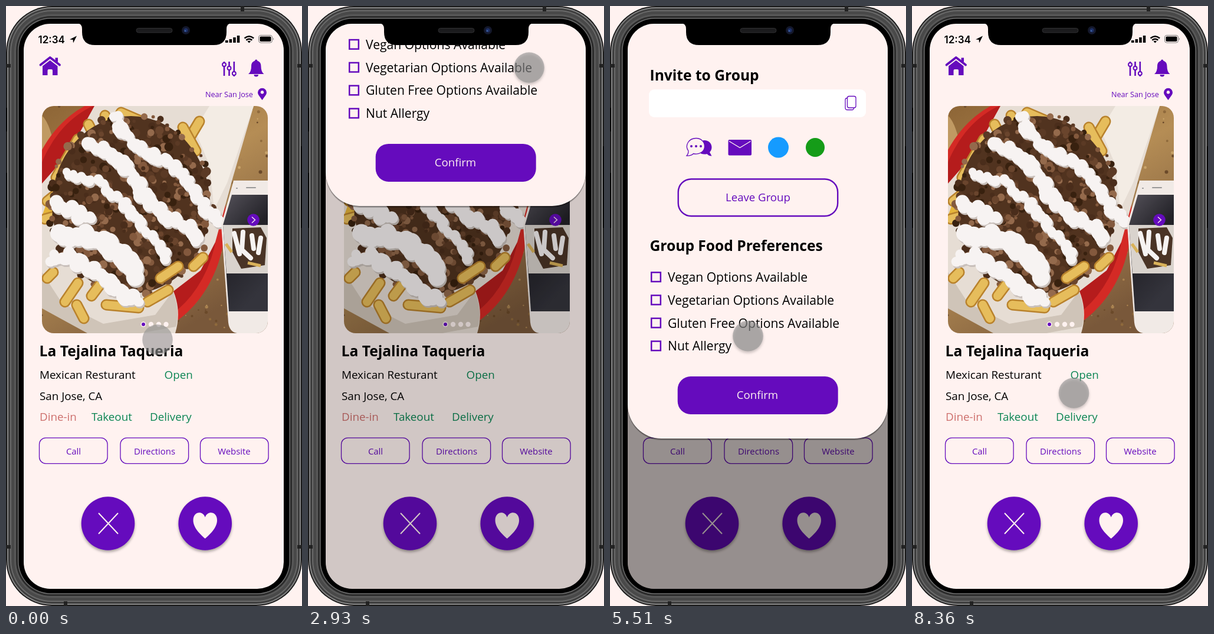
These frames come from a looping animation (502 px wide and 1014 px high, 8920 ms). An HTML page:

```html
<!DOCTYPE html>
<html lang="en">
<head>
<meta charset="utf-8">
<title>Restaurant finder</title>
<style>
html, body { margin: 0; height: 100%; overflow: hidden; background: #fff2f0; }
svg { display: block; width: 100%; height: 100%; }
text { font-family: "Open Sans", "Noto Sans", sans-serif; font-size: 18.8px; }
.h { font-size: 24.6px; font-weight: 700; }
.opt { font-size: 21.1px; }
.btn { font-size: 14.9px; text-anchor: middle; }
.big { font-size: 18.6px; text-anchor: middle; }
.p { fill: #650bbd; }
.o { fill: none; stroke: #650bbd; }
.w { fill: none; stroke: #fff2f0; }
.green { fill: #0b8553; }
.shade { filter: drop-shadow(0 3px 2px #0005); }
</style>
</head>
<body>
<svg viewBox="0 0 502 1014" xmlns="http://www.w3.org/2000/svg">
  <defs>
    <clipPath id="screen"><rect x="30" y="30" width="441" height="955" rx="45"/></clipPath>
    <clipPath id="card"><rect x="61" y="169" width="383" height="384" rx="20"/></clipPath>
    <linearGradient id="table" x2=".6" y2="1">
      <stop stop-color="#8d6536"/><stop offset=".5" stop-color="#b58d55"/><stop offset="1" stop-color="#79583a"/>
    </linearGradient>
    <linearGradient id="glass" y2="1" x2=".4">
      <stop stop-color="#55525a"/><stop offset=".5" stop-color="#222127"/><stop offset="1" stop-color="#34343c"/>
    </linearGradient>
  </defs>

  <g id="body"></g>

  <g clip-path="url(#screen)">
    <path fill="#fff2f0" d="M30 30h441v955H30z"/>

    <!-- status bar -->
    <text x="54.5" y="63" style="font:600 17px Inter,sans-serif">12:34</text>
    <path d="M120 50.500L108 56.500l5.500.500.500 5.500z"/>
    <path d="M372 58h4.500v4H372zM378.600 56h4.500v6h-4.500zM385.200 53h4.500v9h-4.500zM391.800 50h4.500v12h-4.500z"/>
    <path fill="none" stroke="#000" stroke-width="2.500" d="M404.500 54.500q7.800-6.500 15.600 0M407.300 57.700q5-4 10 0"/>
    <path d="M409.500 59.800q2.800-2 5.600 0l-2.800 2.800z"/>
    <rect x="428.500" y="49.500" width="23" height="12.500" rx="3.500" fill="none" stroke="#777"/>
    <rect x="430.500" y="51.500" width="19" height="8.500" rx="1.800"/>
    <path fill="#777" d="M453 53.500q2 2.200 0 4.500z"/>

    <!-- toolbar -->
    <path class="o" stroke-width="3.800" stroke-linejoin="round" stroke-linecap="round" d="M58.500 99.500L74.700 87l16.300 12.500"/>
    <path class="p" d="M62 101.500l12.700-9.700 12.800 9.700V117H79v-8q0-2-2-2h-4.500q-2 0-2 2v8H62zM83.500 87.500h4.500v7h-4.500z"/>
    <g class="o" stroke-width="2">
      <path d="M370 94v2m0 6v16M378.500 94v8m0 6v10M386.800 94v17m0 6v2" stroke-width="2.600"/>
      <circle cx="370" cy="99" r="3"/><circle cx="378.500" cy="105" r="3"/><circle cx="386.800" cy="114" r="3"/>
    </g>
    <path class="p" d="M411 115q5-4 5-13c0-6 3-8.500 6-9.200a2.200 2.200 0 0 1 4.400 0c3 .7 6.100 3.200 6.100 9.200q0 9 5 13zM420.500 116h7.500a3.700 3.500 0 0 1-7.500 0z"/>
    <text class="p" x="338" y="153.500" style="font-size:12.600px">Near San Jose</text>
    <path class="p" fill-rule="evenodd" d="M434.500 159c-4-6-7.500-9-7.500-13a7.500 7.200 0 0 1 15 0c0 4-3.500 7-7.500 13zm0-16a2.800 2.800 0 1 0 .01 0z"/>

    <!-- picture of the dish -->
    <g clip-path="url(#card)">
      <path fill="url(#table)" d="M61 169h383v384H61z"/>
      <g id="grain"></g>
      <path fill="#c09a63" d="M61 185q16 15 25 75l-8 35-17 15z"/>
      <ellipse cx="203" cy="356" rx="170" ry="205" fill="#d42a25"/>
      <ellipse cx="202" cy="352" rx="158" ry="195" fill="#b51c1c"/>
      <path fill="#e6ddd4" d="M150 169h270l-35 120-30 110-25 48-46 35q14 35 3 71H165q-45-14-75-35l-29-28V300l44-50z"/>
      <path fill="#f3ece4" d="M345 169h75l-45 130-22 45-8-75-25-60z"/>
      <path fill="#cfc4b8" d="M61 450l34 52 70 35 88-15 30-40q13 35 5 60l-60 11h-90l-77-42z"/>
      <path fill="#e5b53b" d="M112 235l45 20-20 60-55 40-21 0 25-70z"/>
      <g id="fries" stroke-linecap="round"></g>
      <ellipse cx="212" cy="336" rx="134" ry="150" fill="#51331f"/>
      <g id="meat"></g>
      <g id="front" stroke-linecap="round"></g>
      <use href="#sauce" x="2" y="3" fill="#c9c0bb"/>
      <g id="sauce"></g>
      <path fill="#f1eae6" d="M386 295h58v258h-52q-13-2-15-18l-12-165z"/>
      <path fill="url(#glass)" d="M383 319h61v197h-66l-10-146z"/>
      <path fill="#d9d3cd" d="M368 370h76v82h-70z"/>
      <path fill="#4a3426" d="M384 376l48-2 10 18-3 46-40 6-15-28z"/>
      <path fill="none" stroke="#f6f3f2" stroke-width="8" stroke-linecap="round" d="M387 384l9 35M402 382l-2 30 15 14M417 388l3 22M432 392l-4 25"/>
      <path stroke="#d9b25a" stroke-width="5" d="M373 402l10 14M410 434l22 5"/>
      <path stroke="#999" stroke-width="2" stroke-linecap="round" d="M408 307h15M391 308h1"/>
    </g>
    <circle class="p" cx="419.500" cy="361.500" r="10.300"/>
    <path class="w" stroke-width="1.300" d="M417 356.500l5.500 5-5.500 5"/>
    <g fill="#fff2f0">
      <circle cx="233" cy="538" r="4.500"/><circle cx="246" cy="538" r="4.200"/>
      <circle cx="259" cy="538" r="4.200"/><circle cx="271.500" cy="538" r="4.200"/>
    </g>
    <circle class="p" cx="233" cy="538" r="3"/>

    <!-- details -->
    <text class="h" x="56.500" y="591.500">La Tejalina Taqueria</text>
    <text x="57" y="630">Mexican Resturant</text>
    <text class="green" x="268.500" y="630">Open</text>
    <text x="57" y="665.500">San Jose, CA</text>
    <text x="57" y="701" fill="#cd6f6c">Dine-in</text>
    <text class="green" x="145" y="701">Takeout</text>
    <text class="green" x="244" y="701">Delivery</text>
    <g class="o" stroke-width="1.300">
      <rect x="56.500" y="729.800" width="115.600" height="43.500" rx="11"/>
      <rect x="194" y="729.800" width="115.600" height="43.500" rx="11"/>
      <rect x="329.500" y="729.800" width="115.600" height="43.500" rx="11"/>
    </g>
    <text class="p btn" x="114.500" y="757.500">Call</text>
    <text class="p btn" x="252" y="757.500">Directions</text>
    <text class="p btn" x="387" y="757.500">Website</text>
    <circle class="p shade" cx="173" cy="874.500" r="45.300"/>
    <circle class="p shade" cx="337.700" cy="874.500" r="45.300"/>
    <path class="w" stroke-width="2" d="M157 857l33 35M190 857l-33 35"/>
    <path fill="#fff2f0" d="M337.700 900c-8-7-20.200-18-20.200-31 0-15 16-17 20.200-5 4.200-12 20.300-10 20.300 5 0 13-12.300 24-20.300 31z"/>

    <path id="dim" d="M30 30h441v955H30z"/>

    <!-- sliding panel -->
    <g id="panel">
      <rect x="30" y="-100" width="441" height="834" rx="57" opacity=".18"/>
      <rect x="30" y="-100" width="441" height="832.500" rx="57" opacity=".3"/>
      <rect x="30" y="-100" width="441" height="831" rx="57" fill="#fff2f0"/>
      <text class="h" x="67.500" y="125.500">Invite to Group</text>
      <rect x="66" y="141" width="368" height="47" rx="9" fill="#fff"/>
      <g class="o" stroke-width="1.300">
        <rect x="402.500" y="152.500" width="14.500" height="19.500" rx="3"/>
        <path d="M402.500 155.500q-3.500 0-3.500 3.500v13q0 3.500 3.500 3.500h8q3 0 3-3.500"/>
      </g>
      <path class="p" d="M158 227c9-1 14.500 5 14.500 11.500 0 4-1.500 6.500-3.500 8.500l3.500 6.500q-5 0-8-3.500-8 2-14-3z"/>
      <path fill="#fff2f0" stroke="#650bbd" stroke-width="1.300" d="M130 253q3-3 3-8c-7-10 1-21.500 13-21.500 8.500 0 14.500 6 14.500 13.500 0 9-9 15-19 12.500q-4 4-11.500 3.500z"/>
      <g class="p"><circle cx="138" cy="237" r="2"/><circle cx="146" cy="237" r="2"/><circle cx="154" cy="237" r="2"/></g>
      <rect class="p" x="200.500" y="226" width="39.500" height="26.500" rx="2"/>
      <path class="w" stroke-width="1.400" d="M202 228.500l18.300 11 18.200-11"/>
      <circle cx="285.500" cy="239" r="17.500" fill="#159bff"/>
      <circle cx="348" cy="239" r="16" fill="#159c18"/>
      <rect class="o" stroke-width="2.400" x="115.700" y="292.500" width="270.500" height="62.500" rx="22"/>
      <text class="p big" x="251" y="330">Leave Group</text>
      <text class="h" x="67.500" y="413.800">Group Food Preferences</text>
      <g id="options"></g>
      <rect class="p" x="114.700" y="626" width="272" height="64" rx="22"/>
      <text class="big" x="250" y="664" fill="#fff2f0">Confirm</text>
    </g>
  </g>

  <!-- notch -->
  <path d="M120 29q9 0 9 10v5q0 22 22 22h201q22 0 22-22v-5q0-10 9-10z"/>
  <rect x="221" y="37.500" width="61" height="7.500" rx="3.700" fill="#1b1b1d" stroke="#303033"/>
  <circle cx="305" cy="41" r="7" fill="#14182b"/>
  <circle cx="305" cy="41" r="3.500" fill="#1d2f66"/>
  <circle cx="304" cy="42" r="1.300" fill="#4267a8"/>

  <circle id="touch" r="25.800" fill="#929292" fill-opacity=".6"/>
</svg>
<script>
const $ = id => document.getElementById(id);
let seed = 7;
const rnd = () => (seed = seed * 16807 % 2147483647) / 2147483647;
const pick = list => list[Math.floor(rnd() * list.length)];
const dot = (x, y, r, fill) =>
  `<circle cx="${x.toFixed(1)}" cy="${y.toFixed(1)}" r="${r.toFixed(1)}"${fill ? ` fill="${fill}"` : ''}/>`;
const repeat = (n, make) => Array.from({ length: n }, (_, i) => make(i)).join('');

// Phone shell: nested rounded rectangles, antenna bands, side keys
const rails = [[0, '#1b1b1b'], [2, '#858585'], [4, '#3d3d3d'], [7, '#6a6a6a'], [9, '#494949'],
  [14, '#585858'], [17, '#2b2b2b'], [20, '#707070'], [21.5, '#000']];
$('body').innerHTML = rails.map(([d, c]) =>
  `<rect x="${d}" y="${d}" width="${502 - 2 * d}" height="${1014 - 2 * d}" rx="${78 - 1.1 * d}" fill="${c}"/>`).join('') +
  '<path fill="#222" d="M0 98h8v6H0zM494 98h8v6h-8zM0 911h8v6H0zM494 911h8v6h-8zM398 0h6v9h-6zM98 1006h6v8h-6z"/>' +
  '<path d="M0 172h2v40H0zM0 282h2v93H0zM500 237h2v138h-2z"/>';

// Dish
$('grain').innerHTML = repeat(220, () =>
  dot(61 + rnd() * 383, 169 + rnd() * 384, 1 + rnd() * 2, pick(['#6b4a2a', '#c9a46a', '#8f6a3c', '#a98250'])));
$('meat').innerHTML = repeat(480, () => {
  const a = rnd() * 6.283, d = Math.sqrt(rnd());
  return dot(212 + 141 * d * Math.cos(a), 336 + 156 * d * Math.sin(a), 2.5 + rnd() * 5,
    pick(['#38210f', '#6a452d', '#83593d', '#4a2d1b', '#5b3a25', '#946a4c']));
});
const fry = ([x, y, u, v]) =>
  `<path stroke="#b9822c" stroke-width="19" d="M${x} ${y}L${u} ${v}"/><path stroke="#e6bd5c" stroke-width="14" d="M${x} ${y}L${u} ${v}"/>`;
$('fries').innerHTML = [[122, 225, 85, 290], [168, 185, 190, 235], [140, 200, 165, 250], [195, 180, 230, 195],
  [328, 195, 310, 225], [300, 205, 322, 245], [70, 330, 85, 318], [66, 360, 95, 352]].map(fry).join('');
$('front').innerHTML = [[70, 460, 80, 450], [122, 468, 100, 500], [145, 490, 160, 470], [120, 505, 132, 528],
  [170, 505, 225, 510], [262, 460, 292, 440], [318, 440, 334, 425], [240, 500, 275, 480]].map(fry).join('');

// Sauce: bumpy ribbons, each a path and a half width
const ribbons = [
  ['M187 188Q195 225 250 252T318 310T362 362', 12],
  ['M140 235Q190 245 215 290T290 365T318 398', 13],
  ['M102 285Q165 290 200 335T250 395T275 428', 10],
  ['M88 335Q120 350 150 365', 13],
  ['M92 388Q150 385 185 410T215 460', 17],
  ['M82 432Q95 410 120 428T175 470T228 494', 14]];
const guide = document.createElementNS('http://www.w3.org/2000/svg', 'path');
$('sauce').innerHTML = ribbons.map(([d, w]) => {
  guide.setAttribute('d', d);
  return repeat(Math.floor(guide.getTotalLength() / 4), i => {
    const q = guide.getPointAtLength(i * 4);
    return dot(q.x + (rnd() - .5) * w, q.y + (rnd() - .5) * w, w * (.55 + rnd() * .4));
  });
}).join('');
$('sauce').setAttribute('style', 'fill:#f7f3f2');
// The shadow copy needs its own fill
const shadow = $('sauce').cloneNode(true);
shadow.removeAttribute('id');
shadow.setAttribute('style', 'fill:#c9c0bb');
shadow.setAttribute('transform', 'translate(2 3)');
document.querySelector('use').replaceWith(shadow);

$('options').innerHTML = ['Vegan Options Available', 'Vegetarian Options Available',
  'Gluten Free Options Available', 'Nut Allergy'].map((label, i) => {
  const y = 466 + i * 38.8;
  return `<rect class="o" stroke-width="2.500" x="70.200" y="${y - 15.8}" width="15.600" height="15.600"/>` +
    `<text class="opt" x="98" y="${y}">${label}</text>`;
}).join('');

// Motion
const span = (t, a, b) => Math.min(1, Math.max(0, (t - a) / (b - a)));
const ease = (u, k) => u < .5 ? (2 * u) ** k / 2 : 1 - (2 - 2 * u) ** k / 2;
const bezier = (u, a, b, c, d) => {
  const v = 1 - u;
  return v * v * v * a + 3 * v * v * u * b + 3 * v * u * u * c + u * u * u * d;
};

function touchAt(t) {
  if (t < 1220) return [257, 564];
  if (t < 4450) {
    const u = ease(span(t, 1160, 2370), 2.5);
    return [257 + 118 * u, 564 - 460 * u];
  }
  const u = span(t, 4420, 6100);
  const drift = t < 6930 ? 0 : t < 8360 ? 1 : 4;
  return [bezier(u, 375, 79, 279, 274.5), bezier(u, 104, 363, 650, 650) + drift];
}

function openness(t) {
  if (t < 2680 || t >= 6750) return 0;
  return t < 6290 ? ease(span(t, 2630, 3270), 2) : 1 - ease(span(t, 6240, 6750), 2);
}

function draw() {
  const t = performance.now() % 8920;
  const p = openness(t), [x, y] = touchAt(t);
  $('dim').setAttribute('opacity', .41 * p);
  $('panel').setAttribute('visibility', p ? 'visible' : 'hidden');
  $('panel').setAttribute('transform', `translate(0 ${-705 * (1 - p)})`);
  $('touch').setAttribute('transform', `translate(${x} ${y})`);
  $('touch').setAttribute('class', t < 1220 ? '' : 'shade');
  requestAnimationFrame(draw);
}
draw();
</script>
</body>
</html>
```
